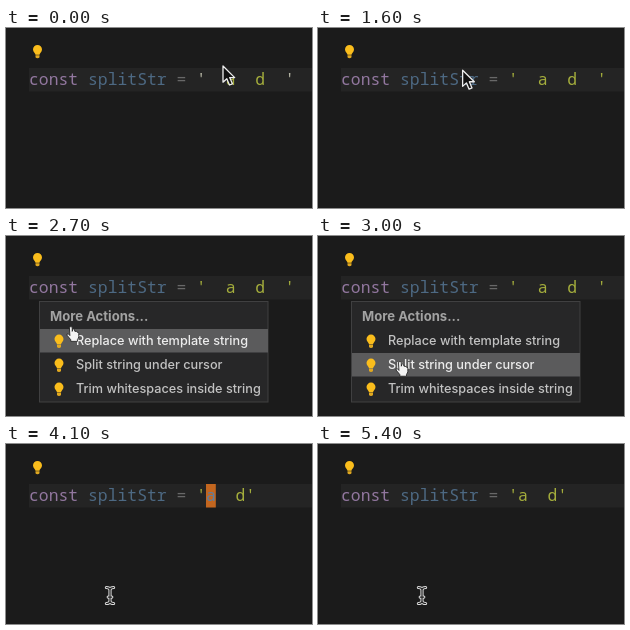
Recreate the animation shown at these times as an HTML page. Size 306x180 px, loop 5.5 s.

```html
<!DOCTYPE html>
<html lang="en">
<head>
<meta charset="utf-8">
<title>Trim whitespaces</title>
<style>
html, body { margin: 0; width: 100%; height: 100%; overflow: hidden; background: #1b1b1b; }
svg { display: block; width: 306px; height: 180px; }
.code { font: 500 16.4px "Noto Sans Mono", "DejaVu Sans Mono", monospace; white-space: pre; }
.menu { font: 500 12.7px Inter, "Open Sans", sans-serif; fill: #c2c2c2; }
.title { font-size: 13.1px; font-weight: 700; fill: #a2a2a2; }
.key { fill: #92779f; }
.name { fill: #4d6983; }
.op { fill: #686868; }
.str { fill: #a4ad3c; }
</style>
</head>
<body>
<svg viewBox="0 0 306 180">
  <defs>
    <g id="bulb">
      <path d="M-2 4.4C-2 2.8-4.5 1.9-4.5-.9A4.5 4.5 0 0 1 4.5-.9C4.5 1.9 2 2.8 2 4.4Z" fill="#fabd1c"/>
      <path d="M-2 4.9H2V7Q1.4 8 0 8T-2 7Z" fill="#e0a820"/>
    </g>
  </defs>
  <rect width="306" height="180" fill="#1b1b1b"/>
  <rect x="23" y="40" width="283" height="23.5" fill="#242424"/>
  <rect id="block" x="200" y="40" width="9.8" height="23.5" fill="#c3661f"/>
  <text class="code" x="23" y="57"><tspan class="key">const </tspan><tspan class="name">splitStr </tspan><tspan class="op">= </tspan><tspan class="str"><tspan class="quote">'</tspan><tspan id="lead"></tspan><tspan id="first">a</tspan>  d<tspan id="trail"></tspan><tspan class="quote">'</tspan></tspan></text>
  <use href="#bulb" x="31.5" y="22.3"/>
  <g id="menu" class="menu">
    <rect x="33.5" y="65.5" width="228.5" height="100.5" fill="#272728" stroke="#404041"/>
    <text class="title" x="44" y="84.5">More Actions...</text>
    <rect id="pick" x="34" width="228" height="23.5" fill="#5b5b5c"/>
    <g id="rows"></g>
  </g>
  <g id="mouse" stroke-linejoin="round" stroke-linecap="round">
    <path id="arrow" d="M0 0V16.2L3.8 12.7 6.5 19 9.4 17.8 6.7 11.6H11.7Z" fill="#111" stroke="#eee" stroke-width="1.3"/>
    <g id="beam" fill="none">
      <path d="M-3.6-8Q-.6-8 0-6Q.6-8 3.6-8M0-6V6M-3.6 8Q-.6 8 0 6Q.6 8 3.6 8M-1.8 1.6H1.8" stroke="#ddd" stroke-width="3.2"/>
      <path d="M-3.6-8Q-.6-8 0-6Q.6-8 3.6-8M0-6V6M-3.6 8Q-.6 8 0 6Q.6 8 3.6 8M-1.8 1.6H1.8" stroke="#222" stroke-width="1.2"/>
    </g>
    <path id="hand" transform="translate(0 1) scale(.87)" d="M-1.5 1.4Q0-.8 1.5 1.4V6Q3-.1 4.6 6.1Q6.1 5.1 7 7Q9 6.2 9 8.6V12Q8.7 14 7.5 15.3V17.5H-.2V15.6L-4.5 10.4Q-5 8.3-3 8.8L-1.5 10.5Z" fill="#f3f3f3" stroke="#222" stroke-width="1"/>
  </g>
</svg>
<script>
const LOOP = 5500, STEP = 100;
const $ = id => document.getElementById(id);
const show = (el, on) => el.setAttribute('visibility', on ? 'inherit' : 'hidden');

const labels = ['Replace with template string', 'Split string under cursor', 'Trim whitespaces inside string'];
$('rows').innerHTML = labels.map((label, i) =>
  `<use href="#bulb" x="53" y="${104 + 24 * i}"/><text x="70" y="${109.4 + 24 * i}">${label}</text>`).join('');
const rowTexts = [...$('rows').querySelectorAll('text')];
const quotes = [...document.querySelectorAll('.quote')];

// time, x, y of the pointer's hot spot
const path = [
  [0, 217, 38], [300, 209, 54], [600, 205, 56], [900, 205, 51.5], [1400, 205, 51.5],
  [1900, 33.5, 25], [2400, 33.5, 25], [2900, 82, 124], [3100, 82, 124],
  [3500, 104, 150.5], [3700, 104, 150.5], [3900, 104, 151.5], [LOOP, 104, 151.5]
];
const pointers = [[0, 'arrow'], [100, 'beam'], [1600, 'arrow'], [2600, 'hand'], [3800, 'beam']];
const picks = [[0, 0], [2900, 1], [3300, 2]];
const blinks = [[0, false], [700, true], [1200, false], [1700, true], [2000, false],
  [3900, true], [4400, false], [4900, true], [5400, false]];

const at = (table, t) => table.filter(([start]) => start <= t).pop()[1];
const ease = p => p * p * (3 - 2 * p);

function position(t) {
  const i = path.findIndex(([end]) => end > t);
  const [t0, x0, y0] = path[i - 1], [t1, x1, y1] = path[i];
  const p = ease((t - t0) / (t1 - t0));
  return [x0 + (x1 - x0) * p, y0 + (y1 - y0) * p];
}

function draw(t) {
  const trimmed = t >= 3800, on = at(blinks, t), pick = at(picks, t);
  const pad = trimmed ? '' : '  ';
  if ($('lead').textContent !== pad) $('lead').textContent = $('trail').textContent = pad;
  $('first').style.fill = trimmed && on ? '#5b7fa3' : '';
  quotes.forEach(q => q.style.fill = t < STEP ? '#b5b5a4' : '');
  show($('block'), on);

  show($('menu'), t >= 2000 && t < 3800);
  $('pick').setAttribute('y', 93 + 24 * pick);
  rowTexts.forEach((el, i) => el.style.fill = i === pick ? '#ececec' : '');

  const pointer = at(pointers, t);
  for (const id of ['arrow', 'beam', 'hand']) show($(id), id === pointer);
  $('mouse').setAttribute('transform', `translate(${position(t)})`);
}

const began = performance.now();
function tick() {
  const t = (performance.now() - began) % LOOP;
  draw(Math.floor(t / STEP) * STEP);
  requestAnimationFrame(tick);
}
tick();
</script>
</body>
</html>
```
